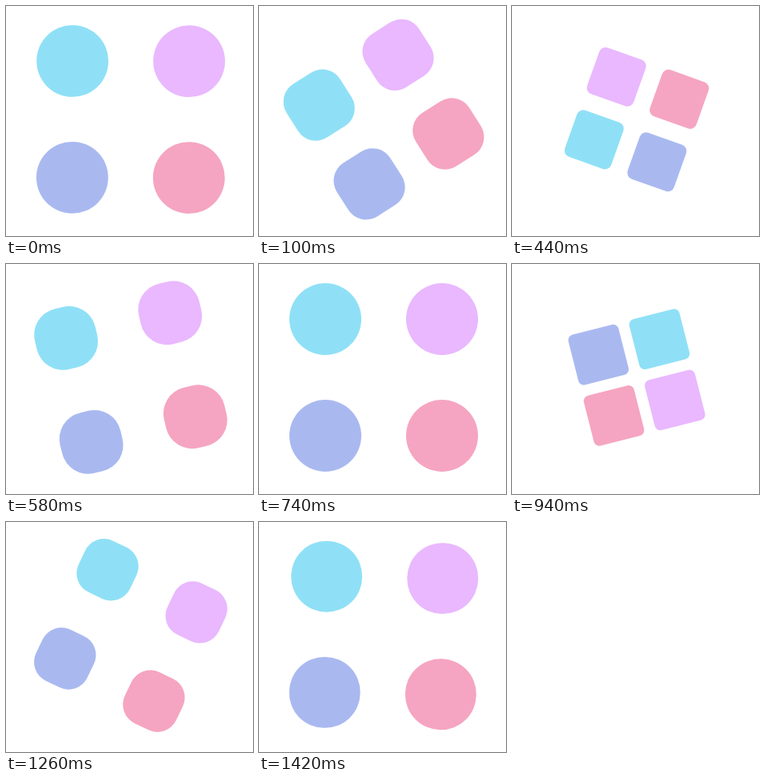
An HTML page with a canvas for the animation above (1.44 s loop, 309 by 288 pixels).

```html
<!DOCTYPE html>
<html lang="en">
<head>
<meta charset="utf-8">
<title>Four shapes</title>
<style>
  html, body { margin: 0; width: 100%; height: 100%; overflow: hidden; background: #fff; }
  canvas { display: block; width: 309px; height: 288px; }
</style>
</head>
<body>
<canvas id="stage"></canvas>
<script>
const W = 309, H = 288, LOOP = 1440;
const LEG = 363, LEAD = 18;            // length of one swing, start offset (ms)
const CENTER = { x: 156, y: 142 };
const SHAPES = [
  { color: '#8fe0f6', x: -1, y: -1 },
  { color: '#e9b8fe', x: 1, y: -1 },
  { color: '#f5a5c1', x: 1, y: 1 },
  { color: '#a9b9f0', x: -1, y: 1 }
];

const canvas = document.getElementById('stage');
const ctx = canvas.getContext('2d');
const dpr = window.devicePixelRatio || 1;
canvas.width = W * dpr;
canvas.height = H * dpr;

function bezier(x1, y1, x2, y2) {
  const at = (a, b, s) => 3 * a * s * (1 - s) ** 2 + 3 * b * s * s * (1 - s) + s ** 3;
  return x => {
    let lo = 0, hi = 1;
    for (let i = 0; i < 24; i++) {
      const mid = (lo + hi) / 2;
      if (at(x1, x2, mid) < x) lo = mid; else hi = mid;
    }
    return at(y1, y2, (lo + hi) / 2);
  };
}
const ease = bezier(0.25, 0.1, 0.25, 1);
const easeInOut = bezier(0.42, 0, 0.58, 1);
const mix = (a, b, p) => a + (b - a) * p;

// Swing left and back, then right and back.
function pose(time) {
  const t = (time - LEAD + 4 * LEG) % (4 * LEG);
  const leg = Math.floor(t / LEG);
  const u = t / LEG - leg;
  const closing = leg % 2 === 0;
  const p = closing ? ease(u) : 1 - ease(u);
  const size = mix(90, 60, closing ? p : 1 - easeInOut(u));
  return {
    angle: (leg < 2 ? -1 : 1) * p * Math.PI / 2,
    offset: mix(73, 33, p),
    size,
    radius: size * mix(0.5, 0.034, p)
  };
}

function roundedSquare(cx, cy, size, r) {
  const l = cx - size / 2, t = cy - size / 2, e = l + size, b = t + size;
  ctx.beginPath();
  ctx.moveTo(l + r, t);
  ctx.arcTo(e, t, e, b, r);
  ctx.arcTo(e, b, l, b, r);
  ctx.arcTo(l, b, l, t, r);
  ctx.arcTo(l, t, e, t, r);
  ctx.closePath();
  ctx.fill();
}

function draw(time) {
  const { angle, offset, size, radius } = pose(time);
  ctx.setTransform(dpr, 0, 0, dpr, 0, 0);
  ctx.fillStyle = '#fff';
  ctx.fillRect(0, 0, W, H);
  ctx.translate(CENTER.x, CENTER.y);
  ctx.rotate(angle);
  for (const s of SHAPES) {
    ctx.fillStyle = s.color;
    roundedSquare(s.x * offset, s.y * offset, size, radius);
  }
}

const start = performance.now();
function tick() {
  draw((performance.now() - start) % LOOP);
  requestAnimationFrame(tick);
}
tick();
</script>
</body>
</html>
```
